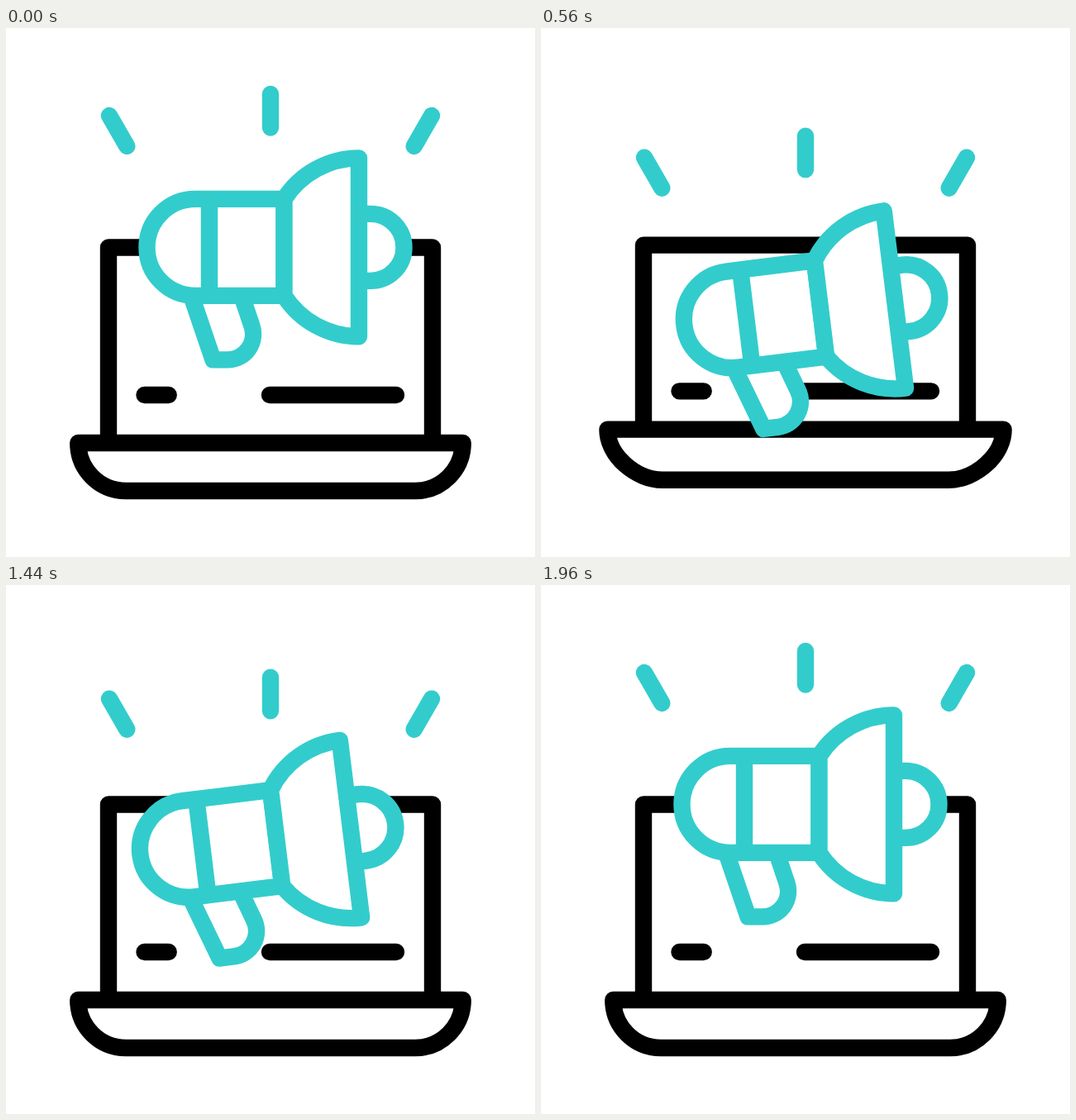
Write an HTML page that moves like this. It is 640 by 640 pixels and loops after 2 s.

```html
<!DOCTYPE html>
<html lang="en">
<head>
<meta charset="utf-8">
<title>Megaphone and laptop</title>
<style>
  html, body { margin: 0; width: 100%; height: 100%; overflow: hidden; background: #fff; }
  svg { display: block; width: 100%; height: 100%; }
  path { stroke-width: 20.4; stroke-linecap: round; stroke-linejoin: round; fill: none; }
  .ink path { stroke: #000; }
  .teal path { stroke: #33cccc; }
  .solid path, path.solid { fill: #fff; }
</style>
</head>
<body>
<svg viewBox="0 0 640 640">
  <g class="ink">
    <path id="screen"/>
    <path id="base" class="solid"/>
    <path id="bars"/>
  </g>
  <g class="teal"><path id="rays"/></g>
  <!-- Origin of this group is the middle of the horn's rim -->
  <g id="megaphone" class="teal solid">
    <path id="knob"/>
    <path d="M-203 58 L-176.5 136 H-159 A31 31 0 0 0 -129.6 95 L-142 58"/>
    <path d="M-90.5 -58.5 H-198 A58.5 58.5 0 0 0 -198 58.5 H-90.5 Z M-181 -58.5 V58.5"/>
    <path d="M-90.5 -58.5 A108 108 0 0 1 0 -108 V108 A108 108 0 0 1 -90.5 58.5 Z"/>
  </g>
</svg>
<script>
const LOOP = 2000, STEP = 40;

const el = id => document.getElementById(id);
const setPath = (id, d) => el(id).setAttribute("d", d);

// Linear rise from 0 to 1, and a rise followed by a fall
const ramp = (t, from, to) => Math.min(1, Math.max(0, (t - from) / (to - from)));
const tent = (t, from, peak, to) => ramp(t, from, peak) - ramp(t, peak, to);

// How strongly each phase of the motion acts at time t
const phases = t => ({
  jump: tent(t, 80, 400, 640),
  crash: tent(t, 400, 640, 880),
  rest: ramp(t, 640, 880) - ramp(t, 1480, 1960),
  leap: tent(t, 1480, 1720, 1960),
  shout: tent(t, 880, 1120, 1440)
});

function drawLaptop({ jump, crash }) {
  const top = 265.5 - 47.5 * jump + 19.5 * crash;
  const barY = 444 - 54 * jump + 20 * crash;
  const deck = 502 - 49 * jump;
  const floor = 560 - 39.7 * jump;
  const left = 87.3 - 10.3 * crash, right = 640 - left;
  const corner = 145 + 2 * (jump + crash), far = 640 - corner;
  const bend = 32;
  setPath("screen", `M124 ${deck} V${top} H516 V${deck}`);
  setPath("base", `M${left} ${deck} H${right}
    C${right} ${deck + bend} ${far + bend} ${floor} ${far} ${floor} H${corner}
    C${corner - bend} ${floor} ${left} ${deck + bend} ${left} ${deck} Z`);
  setPath("bars", `M167.5 ${barY} H196.7 M319 ${barY} H472`);
}

function drawRays({ jump, crash, rest, leap, shout }) {
  const dy = -42 * jump + 97 * crash + 31.7 * rest - 76 * leap;
  const size = 1 - shout;
  const ray = (x, y, w, h) => `M${x} ${y + dy} l${w * size} ${h * size}`;
  setPath("rays", ray(125, 106, 21.3, 37) + ray(320, 80, 0, 40.5) + ray(515, 106, -21.3, 37));
}

function drawMegaphone({ jump, crash, rest, leap, shout }) {
  const x = 427 - 11.3 * jump + 7 * crash - 10 * rest + 5 * leap;
  const y = 265.4 - 50.8 * jump + 120 * crash + 29.7 * rest - 146 * leap;
  const angle = -7 * (jump + crash + rest);
  el("megaphone").setAttribute("transform", `translate(${x} ${y}) rotate(${angle})`);

  // The knob bulges outwards with each shout
  const k = 2 * shout;
  const half = 40.5 + 3.5 * k, reach = 54.5 + 7.5 * k;
  setPath("knob", `M0 ${-half} H14
    C${36.4 + 9 * k} ${-half - 3 * k} ${reach - 2 * k} ${-22.4 - 7.6 * k} ${reach} 0
    S${36.4 + 4 * k} ${half - 2 * k} ${14 - 4 * k} ${half} H0`);
}

const start = performance.now();
function tick() {
  const t = (performance.now() - start) % LOOP;
  const now = phases(Math.floor(t / STEP) * STEP);
  drawLaptop(now);
  drawRays(now);
  drawMegaphone(now);
  requestAnimationFrame(tick);
}
tick();
</script>
</body>
</html>
```
